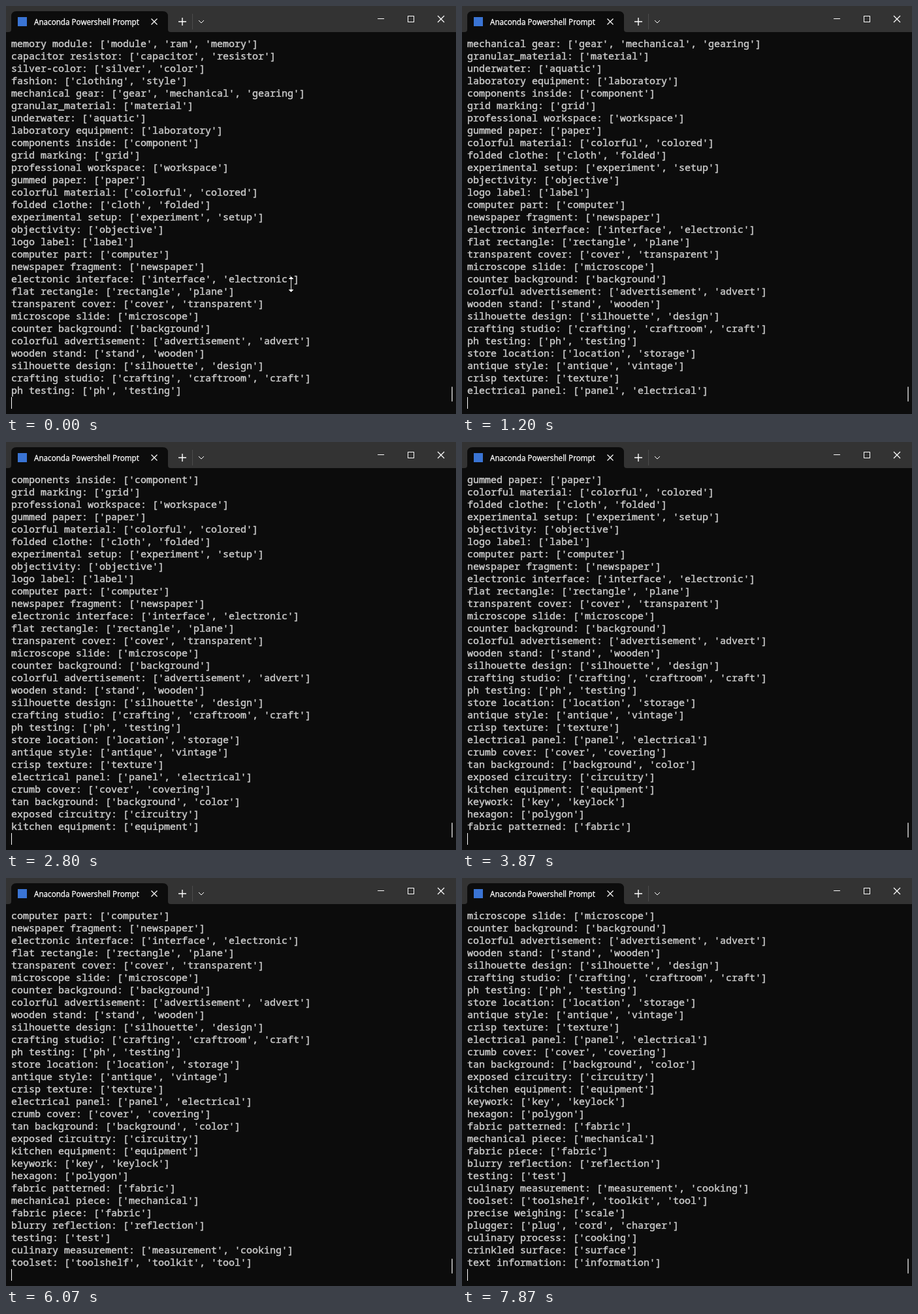
Animation of 689 by 626 pixels, one loop 8 s. Source, as an HTML page:

```html
<!DOCTYPE html>
<html lang="en">
<head>
<meta charset="utf-8">
<title>Terminal output</title>
<style>
  html, body { margin: 0; width: 100%; height: 100%; overflow: hidden; background: #0c0c0c; }
  svg { display: block; width: 100vw; height: 100vh; }
  #rows { font: 500 15px "Noto Sans Mono", "DejaVu Sans Mono", monospace; fill: #ccc; stroke: #ccc; stroke-width: .45; font-variant-ligatures: none; }
  .title { font: 500 11.7px "Open Sans", "Noto Sans", sans-serif; fill: #fff; stroke: #fff; stroke-width: .3; }
  .icons { fill: none; stroke: #fff; }
</style>
</head>
<body>
<svg viewBox="0 0 689 626">
  <rect width="689" height="626" fill="#0c0c0c"/>
  <rect width="689" height="40" fill="#333"/>
  <path d="M4 40Q8 40 8 36V16Q8 8 16 8H240Q248 8 248 16V36Q248 40 252 40Z" fill="#0c0c0c"/>
  <rect x="18" y="17" width="14" height="14" fill="#3a74d4"/>
  <text class="title" x="43" y="29">Anaconda Powershell Prompt</text>
  <path d="M285.5 12V36" stroke="#4b4b4b"/>
  <g class="icons">
    <path d="M222.5 19.5l9 9m0-9l-9 9" stroke-width="1.2"/>
    <path d="M264 24H276M270 18V30" stroke-width="1.4"/>
    <path d="M295 22l4 4l4-4"/>
    <path d="M569 19.5H579"/>
    <rect x="615.5" y="15.5" width="9" height="9"/>
    <path d="M661 15l10 10m0-10l-10 10" stroke-width="1.2"/>
  </g>
  <g id="rows"></g>
  <rect id="caret" x="8" y="600" width="1" height="18" fill="#fff"/>
  <rect x="682" y="584" width="2" height="23" rx="1" fill="#9d9d9d"/>
  <path id="pointer" d="M0-12L4-8H.5V8H4L0 12L-4 8H-.5V-8H-4Z" fill="#fff" stroke="#000" stroke-width="2" paint-order="stroke"/>
</svg>
<script>
const LOOP = 8000, VISIBLE = 29, LINE_HEIGHT = 19, FIRST_BASELINE = 63;

const lines = `memory module:module,ram,memory
capacitor resistor:capacitor,resistor
silver-color:silver,color
fashion:clothing,style
mechanical gear:gear,mechanical,gearing
granular_material:material
underwater:aquatic
laboratory equipment:laboratory
components inside:component
grid marking:grid
professional workspace:workspace
gummed paper:paper
colorful material:colorful,colored
folded clothe:cloth,folded
experimental setup:experiment,setup
objectivity:objective
logo label:label
computer part:computer
newspaper fragment:newspaper
electronic interface:interface,electronic
flat rectangle:rectangle,plane
transparent cover:cover,transparent
microscope slide:microscope
counter background:background
colorful advertisement:advertisement,advert
wooden stand:stand,wooden
silhouette design:silhouette,design
crafting studio:crafting,craftroom,craft
ph testing:ph,testing
store location:location,storage
antique style:antique,vintage
crisp texture:texture
electrical panel:panel,electrical
crumb cover:cover,covering
tan background:background,color
exposed circuitry:circuitry
kitchen equipment:equipment
keywork:key,keylock
hexagon:polygon
fabric patterned:fabric
mechanical piece:mechanical
fabric piece:fabric
blurry reflection:reflection
testing:test
culinary measurement:measurement,cooking
toolset:toolshelf,toolkit,tool
precise weighing:scale
plugger:plug,cord,charger
culinary process:cooking
crinkled surface:surface
text information:information`.split("\n").map(line => {
  const [term, tags] = line.split(":");
  return `${term}: [${tags.split(",").map(tag => `'${tag}'`).join(", ")}]`;
});

// Moments at which a new line is printed and the screen scrolls by one row.
const printTimes = [130, 470, 800, 1200, 1600, 2000, 2400, 2800, 3130, 3530, 3870,
  4200, 4530, 4930, 5200, 5600, 6070, 6400, 6800, 7130, 7530, 7870];
const caretGaps = [[2000, 2070], [3130, 3200]];
const pointerPath = [[0, 427], [70, 427], [200, 440], [400, 440], [1130, 642]];

const rowGroup = document.getElementById("rows");
const caret = document.getElementById("caret");
const pointer = document.getElementById("pointer");
const rows = Array.from({ length: VISIBLE }, (_, i) => {
  const row = document.createElementNS("http://www.w3.org/2000/svg", "text");
  row.setAttribute("x", 8);
  row.setAttribute("y", FIRST_BASELINE + i * LINE_HEIGHT);
  return rowGroup.appendChild(row);
});

function interpolate(path, t) {
  const next = path.findIndex(([time]) => time > t);
  if (next < 0) return path[path.length - 1][1];
  const [t0, y0] = path[next - 1], [t1, y1] = path[next];
  return y0 + (y1 - y0) * (t - t0) / (t1 - t0);
}

let shownOffset = -1;
function draw(t) {
  const offset = printTimes.filter(time => time <= t).length;
  if (offset !== shownOffset) {
    rows.forEach((row, i) => row.textContent = lines[offset + i]);
    shownOffset = offset;
  }
  const hidden = caretGaps.some(([from, to]) => t >= from && t < to);
  caret.setAttribute("visibility", hidden ? "hidden" : "visible");
  pointer.setAttribute("transform", `translate(436.5 ${interpolate(pointerPath, t)})`);
}

const start = performance.now();
function tick() {
  draw((performance.now() - start) % LOOP);
  requestAnimationFrame(tick);
}
tick();
</script>
</body>
</html>
```
